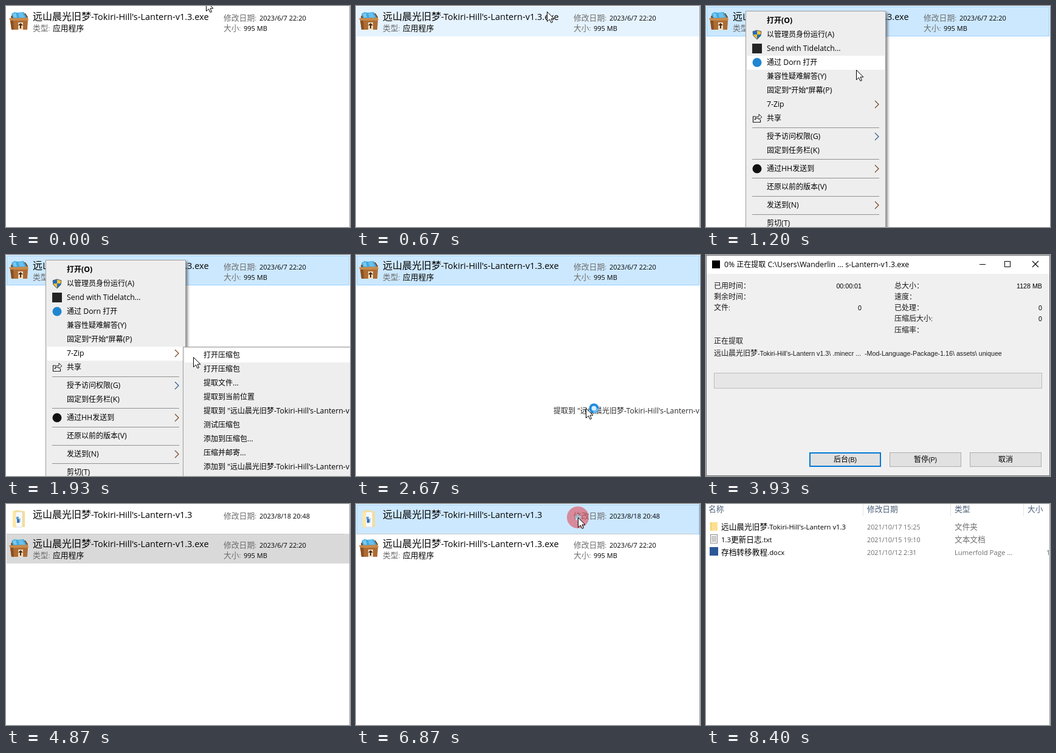
An HTML page with a canvas that plays this animation: 566x364 px, repeating every 9200 ms.

```html
<!DOCTYPE html>
<html lang="zh">
<head>
<meta charset="utf-8">
<style>
html, body { margin: 0; width: 100%; height: 100%; overflow: hidden; background: #fff; }
canvas { display: block; }
</style>
</head>
<body>
<canvas id="stage" width="566" height="364"></canvas>
<script>
const g = document.getElementById('stage').getContext('2d');
const W = 566, H = 364, LOOP = 9200;
const PACK = "远山晨光旧梦-Tokiri-Hill's-Lantern";
const NAME = PACK + '-v1.3';
const GRAY = '#6d6d6d';

// Text styles: CJK size, Latin size, Latin family
const TITLE = [16, 14.5, 'Open Sans'];
const SMALL = [12.8, 11, 'Open Sans'];
const MENU = [12, 12.3, 'Open Sans'];
const LIST = [12.7, 11.3, 'Open Sans'];
const DIALOG = [12, 10.7, 'Liberation Sans'];

function text(s, x, cy, style, color = '#000', align = 0, weight = 400) {
  const [cjk, latin, family] = style;
  const runs = s.match(/[\u2e80-\uffff]+|[^\u2e80-\uffff]+/g).map(run => {
    const font = /[\u2e80-\uffff]/.test(run)
      ? `${weight} ${cjk}px "Noto Sans CJK SC", "Noto Sans CJK", sans-serif`
      : `${weight} ${latin}px "${family}", sans-serif`;
    g.font = font;
    return { run, font, width: g.measureText(run).width };
  });
  x -= align * runs.reduce((sum, r) => sum + r.width, 0);
  g.fillStyle = color;
  for (const r of runs) {
    g.font = r.font;
    g.fillText(r.run, x, Math.round(cy + cjk * 0.36));
    x += r.width;
  }
}

function rect(x, y, w, h, fill, border, line = 1) {
  g.fillStyle = border || fill;
  g.fillRect(x, y, w, h);
  if (border) {
    g.fillStyle = fill;
    g.fillRect(x + line, y + line, w - 2 * line, h - 2 * line);
  }
}

function poly(points, fill, stroke, width = 1, open) {
  g.beginPath();
  for (let i = 0; i < points.length; i += 2) g.lineTo(points[i], points[i + 1]);
  if (!open) g.closePath();
  if (fill) { g.fillStyle = fill; g.fill(); }
  if (stroke) { g.strokeStyle = stroke; g.lineWidth = width; g.stroke(); }
}

function ring(x, y, r, width, color, from = 0, to = 7) {
  g.beginPath();
  g.arc(x, y, r, from, Math.min(to, from + 2 * Math.PI));
  g.strokeStyle = color;
  g.lineWidth = width;
  g.stroke();
}

function at(x, y, draw) {
  g.save();
  g.translate(x, y);
  draw();
  g.restore();
}

// ---- icons ----
function boxIcon() {
  poly([8, 17, 13, 12, 32, 12, 36, 18, 34, 24, 9, 24], '#7a4a22');
  poly([9, 13, 14, 10, 19, 11, 29, 10, 34, 19, 32, 21, 12, 21], '#3fa9e0');
  poly([11, 13, 16, 11, 18, 19, 13, 19], '#7cc8ee');
  poly([20, 12, 27, 11, 31, 19, 22, 19], '#6bbfec');
  poly([5, 20, 13, 20, 36, 19, 37, 23, 35, 25, 7, 25], '#c98a4c');
  poly([7, 24, 36, 24, 35, 39, 9, 39], '#ad6c34');
  poly([7, 24, 12, 24, 13, 39, 9, 39], '#8a4f22');
  rect(20, 27, 8, 12, '#f0dcc0');
  poly([24, 28, 28, 32, 25, 32, 25, 37, 23, 37, 23, 32, 20, 32], '#4a2a12');
}

function openFolderIcon() {
  poly([11, 12, 18, 10, 31, 12, 31, 38, 11, 38], '#f6dc92');
  poly([16, 13, 27, 13, 27, 38, 16, 38], '#fbfbfb', '#dcdcdc');
  rect(17, 21, 4, 4, '#5aa0dc');
  rect(18, 25, 4, 6, '#3b6fb0');
  rect(22, 23, 2, 7, '#a8c8e4');
  poly([11, 12, 16, 14, 16, 40, 11, 37], '#ffe7a2');
}

function shieldIcon(y) {
  const shape = [84, y - 7, 91, y - 5, 90, y + 2, 84, y + 8, 78, y + 2, 77, y - 5];
  g.save();
  poly(shape);
  g.clip();
  rect(76, y - 8, 8, 8, '#1c6fc4');
  rect(84, y - 8, 8, 8, '#fbc02d');
  rect(76, y, 8, 9, '#fbc02d');
  rect(84, y, 8, 9, '#1c6fc4');
  g.restore();
  poly(shape, null, '#4a5a70');
}

function shareIcon(y) {
  poly([82, y - 3, 77.5, y - 3, 77.5, y + 6.5, 89.5, y + 6.5, 89.5, y + 2], null, '#222', 1.2, true);
  poly([80, y + 3, 82, y - 2, 87, y - 3, 87, y - 7, 92, y - 2, 87, y + 2, 87, y, 83, y], '#eee', '#222');
}

function dot(x, y, r, color) {
  g.beginPath();
  g.arc(x, y, r, 0, 7);
  g.fillStyle = color;
  g.fill();
}

// ---- file browser ----
function row(y, fill, border) {
  if (fill) rect(1, y + 1, 564, 49, fill, border);
}

function exeRow(y) {
  at(0, y, () => {
    boxIcon();
    text(NAME + '.exe', 44, 17, TITLE);
    text('类型:', 44, 36, SMALL, GRAY);
    text('应用程序', 77, 36, SMALL);
    text('修改日期:', 358, 19, SMALL, GRAY);
    text('2023/6/7 22:20', 417, 19, SMALL);
    text('大小:', 358, 36, SMALL, GRAY);
    text('995 MB', 391, 36, SMALL);
  });
}

function exeOnly(t, cursor) {
  if (t >= 730) row(0, '#cce8ff', '#99d1ff');
  else if (cursor.y > 0) row(0, '#e5f3ff');
  exeRow(0);
}

function withFolder(t, cursor) {
  if (t < 6800) row(48, t < 4870 ? '#cce8ff' : '#d9d9d9');
  if (t >= 6800) row(0, '#cce8ff', '#99d1ff');
  else if (cursor && cursor.y > 0) row(0, '#e5f3ff');
  rect(1, 49, 555, 1, '#c8c8c8');
  openFolderIcon();
  text(NAME, 44, 17, TITLE);
  text('修改日期:', 358, 19, SMALL, GRAY);
  text('2023/8/18 20:48', 417, 19, SMALL);
  exeRow(48);
}

function details(t) {
  [['名称', 4], ['修改日期', 265], ['类型', 409], ['大小', 529]]
    .forEach(([s, x]) => text(s, x, 8, LIST, '#4c607a'));
  [258, 402, 522].forEach(x => rect(x, 0, 1, 20, '#e5e5e5'));
  if (t < 7130) return;
  rect(7, 30, 12, 14, '#f2cd6c');
  rect(9, 30, 10, 14, '#ffe08f');
  rect(7, 50, 12, 15, '#fff', '#8a8a8a');
  for (let y = 53; y < 63; y += 2) rect(9, y, 8, 1, '#9a9a9a');
  rect(6, 71, 14, 14, '#2b5797');
  [
    [PACK + ' v1.3', '2021/10/17 15:25', '文件夹'],
    ['1.3更新日志.txt', '2021/10/15 19:10', '文本文档'],
    ['存档转移教程.docx', '2021/10/12 2:31', 'Lumerfold Page ...']
  ].forEach(([name, date, type], i) => {
    const y = 37 + 21 * i;
    text(name, 25, y, LIST);
    text(date, 265, y, [12.7, 10.8, 'Open Sans'], GRAY);
    text(type, 409, y, LIST, GRAY);
  });
  text('1', 560, 79, LIST, '#4c607a');
}

// ---- context menus ----
const ITEMS = [
  [24, '打开(O)'], [47, '以管理员身份运行(A)'], [70, 'Send with Tidelatch...'],
  [93, '通过 Dorn 打开'], [116, '兼容性疑难解答(Y)'], [139, '固定到“开始”屏幕(P)'],
  [162, '7-Zip'], [185, '共享'], [215, '授予访问权限(G)'], [238, '固定到任务栏(K)'],
  [268, '通过HH发送到'], [298, '还原以前的版本(V)'], [328, '发送到(N)'], [358, '剪切(T)']
];
const EXTRACT = `提取到 "${NAME}\\"`;
const SUBITEMS = ['打开压缩包', '打开压缩包', '提取文件...', '提取到当前位置', EXTRACT,
  '测试压缩包', '添加到压缩包...', '压缩并邮寄...', `添加到 "${NAME}.7z"`];

function panel(x, y, w) {
  g.save();
  g.shadowColor = 'rgba(0,0,0,.45)';
  g.shadowBlur = 4;
  g.shadowOffsetX = g.shadowOffsetY = 3;
  rect(x, y, w, 400, '#a0a0a0');
  g.restore();
  rect(x + 1, y + 1, w - 2, 398, '#eee');
}

function chevron(x, y, color) {
  poly([x, y - 6, x + 6, y, x, y + 6], null, color, 1.2, true);
}

function mainMenu(t, cursor) {
  panel(65, 8, 231);
  const hover = t >= 1400 ? 162 : cursor.x < 296 && 24 + 23 * Math.floor((cursor.y - 13) / 23.01);
  for (const [y, label] of ITEMS) {
    if (y === hover) rect(68, y - 11, 226, 23, '#fff');
    text(label, 100, y, MENU, '#000', 0, y === 24 ? 700 : 400);
  }
  [201, 253, 284, 314, 344].forEach(y => rect(76, y - 1, 209, 1, '#919191'));
  shieldIcon(47);
  rect(76, 62, 16, 16, '#242424');
  dot(84, 93, 7.5, '#1f86d0');
  shareIcon(185);
  dot(84, 268, 7.5, '#111');
  chevron(278, 162, '#7a4520');
  chevron(278, 215, '#2c5d8f');
  chevron(278, 268, '#7a4520');
  chevron(278, 328, '#7a4520');
}

function subMenu(cursor) {
  panel(291, 151, 330);
  SUBITEMS.forEach((label, i) => {
    const y = 165 + 23 * i;
    if (cursor.x > 293 && Math.abs(cursor.y - y) < 11.5) rect(294, y - 11, 300, 23, '#fff');
    text(label, 325, y, MENU);
  });
}

// ---- extraction window ----
const ASSETS = [[3930, 'uniquee'], [3670, 'tools'], [3470, 'stones'], [3400, 'lights'], [3330, 'items'], [0, 'books']];

function extraction(t) {
  rect(0, 0, W, H, '#f0f0f0', '#6e6e6e');
  rect(1, 1, W - 2, 30, '#fff');
  rect(10, 9, 13, 13, '#000');
  text("0% 正在提取 C:\\Users\\Wanderlin ... s-Lantern-v1.3.exe", 30, 15.5, MENU);
  rect(450, 15, 10, 1, '#000');
  rect(491, 10, 10, 10, '#fff', '#000');
  poly([537, 10, 547, 20], null, '#000', 1.1, true);
  poly([547, 10, 537, 20], null, '#000', 1.1, true);

  const label = (s, x, y) => text(s, x, y, DIALOG, '#1a1a1a');
  const value = (s, x, y) => text(s, x, y, DIALOG, '#000', 1);
  ['已用时间：', '剩余时间：', '文件:'].forEach((s, i) => label(s, 13, 50.5 + 18.2 * i));
  ['总大小：', '速度：', '已处理：', '压缩后大小:', '压缩率：'].forEach((s, i) => label(s, 310, 50.5 + 18.2 * i));
  value(t < 3670 ? '00:00:00' : '00:00:01', 256, 51);
  value('0', 256, 87);
  value('1128 MB', 553, 51);
  value('0', 553, 87);
  value('0', 553, 105);
  label('正在提取', 13, 142);
  if (t < 4200) {
    const asset = ASSETS.find(([from]) => t >= from)[1];
    label(PACK + ' v1.3\\ .minecr ... ', 13, 162);
    label('-Mod-Language-Package-1.16\\ assets\\ ' + asset, 261, 162);
  } else {
    label(PACK + ' v1.3\\ .minecraft\\ mods\\', 13, 162);
    label(t < 4330 ? 'forge-1.16.jar' : 'crafting-1.16.jar', 13, 175);
  }
  rect(13, 194, 540, 26, '#e6e6e6', '#bcbcbc');
  ['后台(B)', '暂停(P)', '取消'].forEach((s, i) => {
    const x = 170 + 132 * i;
    rect(x, 325, 118, 24, '#e1e1e1', i ? '#adadad' : '#0078d7', i ? 1 : 2);
    text(s, x + 59, 337, DIALOG, '#000', 0.5);
  });
}

// Fade and zoom used when the window opens and closes
function fadeWindow(t, amount) {
  const k = 0.9 + 0.1 * amount;
  g.save();
  g.globalAlpha = amount;
  g.translate(W / 2, H / 2);
  g.scale(k, k);
  g.translate(-W / 2, -H / 2);
  extraction(t);
  g.restore();
}

// ---- pointer ----
const TRACK = [
  [0, 329, -8], [730, 314, 9], [930, 314, 9], [1200, 247, 105], [1400, 250, 159],
  [1600, 250, 159], [1870, 305, 164], [2330, 378, 252], [3270, 378, 252], [3400, 511, 190],
  [6000, 388, -20], [6330, 365, 22], [7470, 365, 22], [7530, 399, 8], [9300, 399, 8]
];
const CLICKS = [[730, 1000], [2470, 2600], [6800, 7000]];

function pointer(t) {
  if (t >= 7600 || (t >= 3470 && t < 6070)) return null;
  const i = TRACK.findIndex(key => key[0] > t);
  const [t0, x0, y0] = TRACK[i - 1], [t1, x1, y1] = TRACK[i];
  const u = (t - t0) / (t1 - t0), e = u * u * (3 - 2 * u);
  return { x: Math.round(x0 + (x1 - x0) * e), y: Math.round(y0 + (y1 - y0) * e) };
}

function drawPointer(t, { x, y }) {
  if (CLICKS.some(([from, to]) => t >= from && t < to)) ring(x, y, 11.5, 13, 'rgba(222,62,74,.55)');
  at(x + 0.5, y + 0.5, () => {
    poly([0, 0, 0, 16, 4, 12.5, 6.5, 18, 9, 17, 6.5, 11.5, 11.5, 11.5], '#fff', '#000');
    if (t >= 2600 && t < 3130) {
      const a = (t - 2670) / 160;
      dot(13, 0, 8, '#1c8be0');
      ring(13, 0, 6, 3, '#6cc0f7', a, a + 1.8);
      dot(13, 0, 4, '#d8eefc');
    }
  });
}

function draw(t) {
  const cursor = pointer(t);
  rect(0, 0, W, H, '#fff');
  if (t < 3130) exeOnly(t, cursor);
  else if (t < 7000) withFolder(t, cursor);
  else details(t);
  // The edge line shows while the browser is out of focus
  if (t < 870 || (t >= 4870 && t < 7000) || t >= 8400) rect(565, 0, 1, H, '#a0a0a0');

  if (t >= 800 && t < 2600) {
    g.globalAlpha = t < 870 ? 0.5 : 1;
    mainMenu(t, cursor);
    g.globalAlpha = 1;
    if (t >= 1800) subMenu(cursor);
  } else if (t >= 2600 && t < 2730) {
    text(EXTRACT, 325, 257, MENU, '#2a2a2a');
  }

  if (t >= 3000 && t < 3130) fadeWindow(t, (t - 2930) / 200);
  else if (t >= 3130 && t < 4470) extraction(t);
  else if (t >= 4470 && t < 4730) fadeWindow(t, (4730 - t) / 330);

  if (cursor) drawPointer(t, cursor);
}

// The screen updates 15 times a second
const start = performance.now();
function tick() {
  const ms = (performance.now() - start) % LOOP;
  const step = Math.floor(ms * 0.015 + 0.06);
  draw(Math.round(step * 20 / 3) * 10);
  requestAnimationFrame(tick);
}
tick();
</script>
</body>
</html>
```
